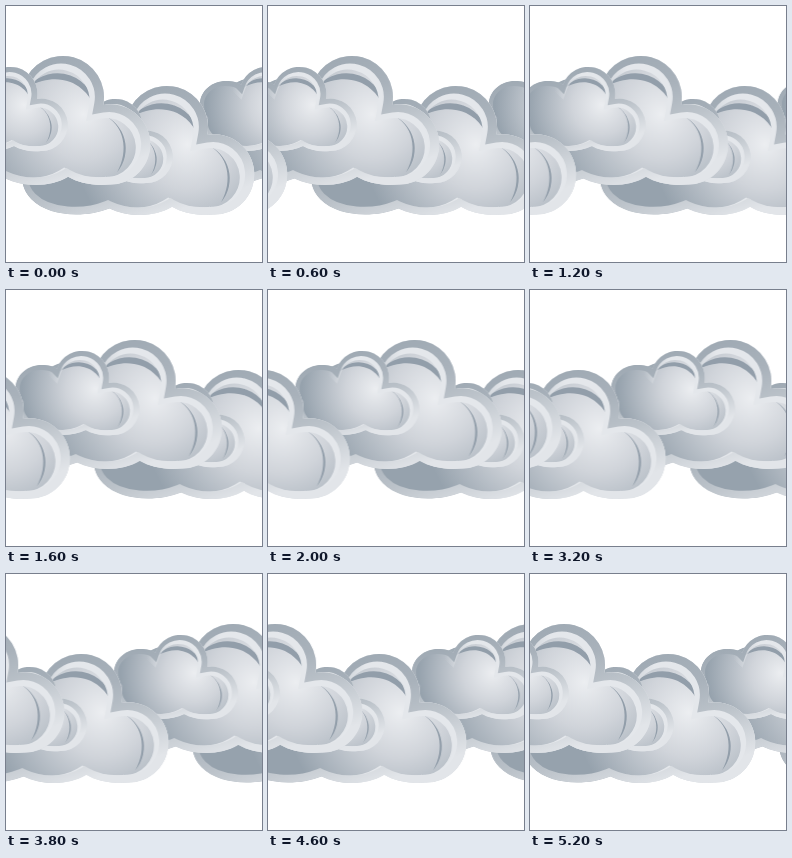
Animation, 256 px wide and 256 px high, one loop 5400 ms. Source, as an HTML page:

```html
<!DOCTYPE html>
<html lang="en">
<head>
<meta charset="utf-8">
<title>Drifting clouds</title>
<style>
  html, body { margin: 0; width: 100%; height: 100%; overflow: hidden; background: #fff; }
  svg { display: block; width: 100vw; height: 100vh; }
  #sky { animation: drift 5400ms steps(27, end) infinite; }
  @keyframes drift {
    from { transform: translateX(0); }
    to { transform: translateX(241.92px); }
  }
  .body { fill: url(#body); }
  .band, .rim { fill: none; }
  .band { stroke: url(#band); stroke-width: 14px; }
  .rim { stroke: url(#rim); stroke-width: 10px; }
</style>
</head>
<body>
<svg viewBox="0 0 256 256">
  <defs>
    <radialGradient id="body" gradientUnits="userSpaceOnUse" cx="80" cy="38" r="74">
      <stop offset="0" stop-color="#eceef1"/>
      <stop offset=".4" stop-color="#d0d4da"/>
      <stop offset="1" stop-color="#96a2ad"/>
    </radialGradient>
    <linearGradient id="rim" gradientUnits="userSpaceOnUse" x1="40" y1="0" x2="70" y2="88">
      <stop offset="0" stop-color="#9da8b2"/>
      <stop offset=".35" stop-color="#a9b2bb"/>
      <stop offset=".6" stop-color="#bcc3ca"/>
      <stop offset=".95" stop-color="#e2e5e9"/>
    </linearGradient>
    <linearGradient id="band" gradientUnits="userSpaceOnUse" x1="35" y1="0" x2="60" y2="0">
      <stop offset="0" stop-color="#dfe3e7" stop-opacity="0"/>
      <stop offset="1" stop-color="#e4e7eb"/>
    </linearGradient>

    <path id="small" d="M0 37C0 24 12 14 26 14C33 14 38 15 41 18A27 27 0 0 1 93 32A26.2 26.2 0 1 1 97 84C86 85 77 83 70 79C58 85 40 86 28 79C10 76 2 64 4 52C1 48 0 42 0 37Z"/>
    <path id="wide" d="M-28 60C-28 48 -10 38 0 37C0 24 12 14 26 14C33 14 38 15 41 18A27 27 0 0 1 93 32A26.2 26.2 0 1 1 97 84C86 85 77 83 70 79C58 86 42 86 29 80C14 86 -10 86 -22 74C-26 70 -28 65 -28 60Z"/>
    <clipPath id="smallEdge"><use href="#small"/></clipPath>
    <clipPath id="wideEdge"><use href="#wide"/></clipPath>

    <g id="shade" fill="#929eaa">
      <path d="M44 20A25 25 0 0 1 88 36C84 20 66 8 44 20Z"/>
      <path d="M92 38A24 24 0 0 1 102 76C110 62 107 44 92 38Z"/>
    </g>

    <g id="puff" clip-path="url(#smallEdge)">
      <use href="#small" class="body"/>
      <use href="#shade"/>
      <use href="#small" class="band" x="-2.5" y="2"/>
      <use href="#small" class="rim" x="-1"/>
    </g>
    <g id="bank" clip-path="url(#wideEdge)">
      <use href="#wide" class="body"/>
      <use href="#shade"/>
      <use href="#wide" class="band" x="-2.5" y="2"/>
      <use href="#wide" class="rim" x="-1"/>
    </g>

    <!-- one period of the sky, back to front -->
    <g id="tile">
      <use href="#bank" transform="translate(59 80) scale(1.53)"/>
      <use href="#puff" transform="translate(43 93)"/>
      <use href="#bank" transform="translate(-45 50) scale(1.53)"/>
      <use href="#puff" transform="translate(-62 61)"/>
    </g>
  </defs>

  <!-- left tiles overlap the ones to their right -->
  <g id="sky">
    <use href="#tile" x="256"/>
    <use href="#tile"/>
    <use href="#tile" x="-256"/>
  </g>
</svg>
</body>
</html>
```
